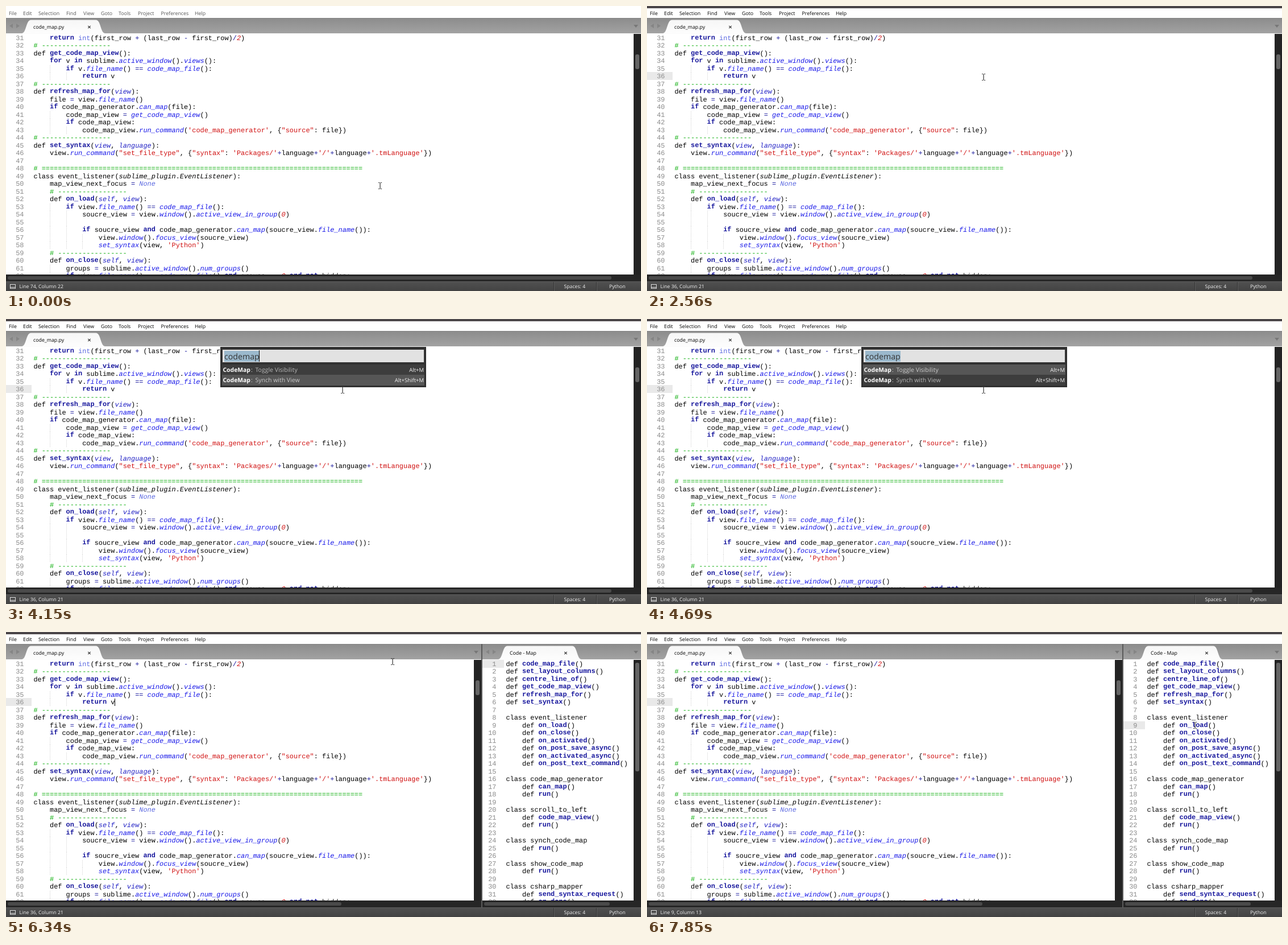
An HTML page with a canvas for the animation above (8000 ms loop, 1117 px wide and 501 px high).

```html
<!DOCTYPE html>
<html lang="en">
<head>
<meta charset="utf-8">
<title>Code map</title>
<style>
html, body { margin: 0; width: 100%; height: 100%; overflow: hidden; background: #fff; }
canvas { display: block; }
</style>
</head>
<body>
<canvas id="stage" width="1117" height="501"></canvas>
<script>
const ctx = document.getElementById('stage').getContext('2d', { alpha: false });
ctx.textRendering = 'geometricPrecision';

const LOOP = 8000, W = 1117, H = 501;
const BAR_END = 48, TOP = 49, BOTTOM = 472, PITCH = 13.5, CHAR = 7.15;
const MONO = '11.917px "Liberation Mono", monospace';
const UI = '"Open Sans", "Noto Sans", sans-serif';
const NAVY = '#16169c', BLUE = '#1818e8', RED = '#d01010', GREEN = '#00aa00';

const rule = '# ' + '-'.repeat(17);
const CODE = `    return int(first_row + (last_row - first_row)/2)
${rule}
def get_code_map_view():
    for v in sublime.active_window().views():
        if v.file_name() == code_map_file():
            return v
${rule}
def refresh_map_for(view):
    file = view.file_name()
    if code_map_generator.can_map(file):
        code_map_view = get_code_map_view()
        if code_map_view:
            code_map_view.run_command('code_map_generator', {"source": file})
${rule}
def set_syntax(view, language):
    view.run_command("set_file_type", {"syntax": 'Packages/'+language+'/'+language+'.tmLanguage'})

# ${'='.repeat(79)}
class event_listener(sublime_plugin.EventListener):
    map_view_next_focus = None
    ${rule}
    def on_load(self, view):
        if view.file_name() == code_map_file():
            soucre_view = view.window().active_view_in_group(0)
            
            if soucre_view and code_map_generator.can_map(soucre_view.file_name()):
                view.window().focus_view(soucre_view)
                set_syntax(view, 'Python')
    ${rule}
    def on_close(self, view):
        groups = sublime.active_window().num_groups()
        if view.file_name() == code_map_file() and groups == 2 and not hidden:`.split('\n');

const MAP = [
  ['', 'code_map_file set_layout_columns centre_line_of get_code_map_view refresh_map_for set_syntax'],
  ['event_listener', 'on_load on_close on_activated on_post_save_async on_activated_async on_post_text_command'],
  ['code_map_generator', 'can_map run'],
  ['scroll_to_left', 'code_map_view run'],
  ['synch_code_map', 'run'],
  ['show_code_map', 'run'],
  ['csharp_mapper', 'send_syntax_request on_done']
].flatMap(([name, defs]) => {
  const list = defs.split(' ').map(d => (name ? '    ' : '') + `def ${d}()`);
  return name ? ['', 'class ' + name, ...list] : list;
});

const MENU = [['File', 5], ['Edit', 30], ['Selection', 57], ['Find', 106], ['View', 136], ['Goto', 167],
  ['Tools', 198], ['Project', 232], ['Preferences', 272.5], ['Help', 332]];

// time, x, y
const MOUSE = [[0, 658, 316], [1430, 703, 295], [1580, 629, 179], [1730, 616, 142], [1880, 592, 124],
  [2030, 592, 125], [6340, 680, 52], [6490, 775, 13], [6610, 885, 27], [6730, 941, 77], [6880, 930, 135],
  [7000, 917, 192], [7150, 955, 183], [7280, 959, 180], [7430, 963, 167], [7580, 964, 166], [7700, 964, 165],
  [7850, 964, 164]];
// time, opacity
const CARET = [[0, 0], [2030, 1], [2560, 0], [5130, 1], [5520, .75], [5660, .35], [5790, 0], [6190, .5], [6340, 1],
  [6490, .75], [6610, .35], [6730, 0], [7150, .35], [7280, 1], [7580, .4], [7700, 0]];
const INPUT_CARET = [[0, 1], [3510, .4], [3630, 0], [4150, 1], [4450, .7], [4570, .35], [4690, 0]];

const at = (track, t) => track.findLast(k => k[0] <= t);

function box(x0, y0, x1, y1, fill) {
  ctx.fillStyle = fill;
  ctx.fillRect(x0, y0, x1 - x0, y1 - y0);
}

function pill(x0, y0, x1, y1, fill) {
  ctx.fillStyle = fill;
  ctx.beginPath();
  ctx.roundRect(x0, y0, x1 - x0, y1 - y0, 3);
  ctx.fill();
}

function poly(points, fill) {
  ctx.fillStyle = fill;
  ctx.beginPath();
  points.forEach(([x, y]) => ctx.lineTo(x, y));
  ctx.closePath();
  ctx.fill();
}

function text(str, x, y, fill, font, align = 'left') {
  ctx.font = font;
  ctx.fillStyle = fill;
  ctx.textAlign = align;
  ctx.fillText(str, x, y);
}

const ui = (str, x, y, fill, size = 8.8, align = 'left', weight = '') =>
  text(str, x, y, fill, `${weight} ${size}px ${UI}`, align);

function shade(y0, y1, a, b) {
  const g = ctx.createLinearGradient(0, y0, 0, y1);
  g.addColorStop(0, a);
  g.addColorStop(1, b);
  return g;
}

const TOKEN = /#.*|'[^']*'|"[^"]*"|\w+|[=+\-\/]+|[^\s\w]/g;

// Splits a line into [column, string, colour, style].
function highlight(line) {
  const out = [];
  let owner = '', prev = '';
  for (const m of line.matchAll(TOKEN)) {
    const s = m[0], call = line[m.index + s.length] === '(';
    let colour = '#000', style = '';
    if (s[0] === '#') colour = GREEN;
    else if (/^['"]/.test(s)) colour = RED;
    else if (s === 'def' || s === 'class') owner = s;
    else if (prev === 'def') [colour, style] = [NAVY, 'bold'];
    else if (prev === 'class') style = '';
    else if (/^(return|for|in|if|and|not)$/.test(s)) [colour, style] = [NAVY, 'bold'];
    else if (s === 'None') [colour, style] = ['#5a68e0', 'italic'];
    else if (s === 'int') colour = '#5a68e0';
    else if (/^\d/.test(s)) [colour, style] = [RED, 'italic'];
    else if (/^\w/.test(s) && owner) [colour, style] = [owner === 'def' ? '#2020c4' : '#000', 'italic'];
    else if (call && /^\w/.test(s)) [colour, style] = [BLUE, 'italic'];
    else if (/^[=+\-\/]/.test(s)) colour = NAVY;
    out.push([m.index, s, colour, style]);
    prev = s;
  }
  return out;
}

const prepare = lines => lines.map(l => ({ indent: l.search(/\S|$/), tokens: highlight(l) }));
const codeLines = prepare(CODE), mapLines = prepare(MAP);

function drawLines(lines, first, x, numberX) {
  lines.forEach(({ indent, tokens }, i) => {
    const y = Math.round(59.5 + i * PITCH);
    text(first + i, numberX, y, '#8a8a8a', MONO, 'right');
    for (let c = 4; c < indent; c += 4) {
      const gx = Math.round(x + c * CHAR);
      for (let d = 0; d < PITCH; d += 2) box(gx, y - 10 + d, gx + 1, y - 9 + d, '#d4d4d4');
    }
    for (const [col, s, colour, style] of tokens)
      text(s, x + col * CHAR, y - (style === 'bold' ? .6 : 0), colour, `${style} ${MONO}`);
  });
}

function drawTab(x, right, title, titleX, closeX) {
  box(x, 21, right, BAR_END, shade(21, BAR_END, '#8c8c8c', '#a2a2a2'));
  box(x, 21, right, 22, '#808080');
  box(x, BAR_END, right, TOP, '#fafafa');
  const a = titleX - 18, b = titleX + 124;
  ctx.beginPath();
  ctx.moveTo(a - 2, BAR_END);
  ctx.bezierCurveTo(a + 6, 47, a + 5, 24.5, a + 14, 24.5);
  ctx.lineTo(b - 14, 24.5);
  ctx.bezierCurveTo(b - 5, 24.5, b - 6, 47, b + 2, BAR_END);
  ctx.fillStyle = shade(24, BAR_END, '#f6f6f6', '#fdfdfd');
  ctx.fill();
  ui(title, titleX, 40, '#000');
  ctx.strokeStyle = '#333';
  ctx.lineWidth = 1.2;
  ctx.beginPath();
  for (const s of [-1, 1]) {
    ctx.moveTo(closeX - 2.2, 37 - 2.2 * s);
    ctx.lineTo(closeX + 2.2, 37 + 2.2 * s);
  }
  ctx.stroke();
  poly([[x + 6, 35], [x + 12, 31], [x + 12, 39]], '#858585');
  poly([[x + 24, 35], [x + 18, 31], [x + 18, 39]], '#858585');
  poly([[right - 13, 33], [right - 5, 33], [right - 9, 38]], '#777');
}

function drawPane(p) {
  const edge = p.right - 13;
  ctx.save();
  ctx.beginPath();
  ctx.rect(p.x, 21, p.right - p.x, 463);
  ctx.clip();
  box(p.x, TOP, edge, BOTTOM, '#fff');
  if (p.active) {
    const y = Math.round(TOP + (p.active - p.first) * PITCH - .5);
    box(p.x, Math.max(TOP, y), p.gutter, y + 14, '#e9e9e9');
  }
  drawLines(p.lines, p.first, p.textX, p.numberX);
  drawTab(p.x, p.right, p.title, p.titleX, p.closeX);
  box(edge, TOP, p.right, BOTTOM, '#232323');
  pill(edge + 3, p.thumb[0], edge + 10, p.thumb[1], '#646464');
  box(p.x, BOTTOM, p.right, 484, '#262626');
  pill(p.x + 3, 475, p.scrollEnd, 481, '#4a4a4a');
  ctx.restore();
}

function drawPalette(t) {
  box(377, TOP, 739, 120, '#303030');
  box(380, 53, 736, 77, '#3c3c3c');
  box(381, 54, 735, 76, '#e2e2e2');
  box(384, 56, 446, 75, '#9bb9cd');
  ui('codemap', 384, 71, '#333', 14.2);
  ctx.globalAlpha = at(INPUT_CARET, t)[1];
  box(445, 55, 446, 75, '#000');
  ctx.globalAlpha = 1;
  const chosen = t < 4310 ? 1 : 0;
  [['Toggle Visibility', 'Alt+M'], ['Synch with View', 'Alt+Shift+M']].forEach(([label, keys], i) => {
    const y = 80 + i * 18, on = i === chosen;
    box(380, y, 736, y + 18 + i, on ? '#565656' : '#3d3d3d');
    ui('CodeMap', 381.5, y + 13, '#fff', 10.4, 'left', 'bold');
    ui(':', 431, y + 13, '#ccc', 10.4);
    ui(label, 438.5, y + 13, on ? '#ccc' : '#b8b8b8', 10.5);
    ui(keys, 735, y + 12.5, '#f4f4f4', 9.5, 'right');
  });
}

function drawStatus(label) {
  box(0, 484, W, H, shade(484, H, '#515151', '#434343'));
  box(0, 484, W, 485, '#5c5c5c');
  ctx.strokeStyle = '#ddd';
  ctx.lineWidth = 1;
  ctx.strokeRect(7.5, 489.5, 9, 7);
  box(8, 494, 16, 495, '#ddd');
  for (const x of [963, 1038]) {
    box(x, 485, x + 1, H, '#353535');
    box(x + 1, 485, x + 2, H, '#5d5d5d');
  }
  ui(label, 23.5, 496, '#f0f0f0', 8.7);
  ui('Spaces: 4', 981.5, 496, '#f0f0f0', 8.7);
  ui('Python', 1061, 496, '#f0f0f0', 8.7);
}

function drawMouse(x, y) {
  if (y < TOP) {
    const shape = [[0, 0], [0, 13], [3, 10.2], [5, 15], [7, 14.2], [5, 9.5], [9, 9.3]].map(([a, b]) => [x + a, y + b]);
    poly(shape, '#fff');
    ctx.strokeStyle = '#000';
    ctx.lineWidth = .9;
    ctx.stroke();
    return;
  }
  box(x - .5, y - 5, x + .7, y + 5, '#333');
  for (const s of [-6, 5]) {
    box(x - 3, y + s, x - .5, y + s + 1, '#444');
    box(x + .7, y + s, x + 3.2, y + s + 1, '#444');
  }
}

function draw(t) {
  const focused = t >= 2030, split = t >= 5130, jumped = t >= 7850;
  box(0, 0, W, 21, '#fff');
  if (focused) box(0, 0, W, 4, '#4b4649');
  MENU.forEach(([s, x]) => ui(s, x, 16, focused ? '#000' : '#555'));

  drawPane({
    x: 0, right: split ? 836 : W, lines: codeLines, first: 31, active: focused && 36, gutter: 45,
    textX: 48.4, numberX: 31.5, title: 'code_map.py', titleX: 48, closeX: 146.5,
    thumb: [85, 111], scrollEnd: split ? 590 : 1065
  });
  if (split) {
    box(836, 21, 838, 484, '#5a5a5a');
    drawPane({
      x: 838, right: W, lines: mapLines, first: 1, active: jumped ? 9 : 1, gutter: 876,
      textX: 879.4, numberX: 862.5, title: 'Code - Map', titleX: 886, closeX: 984.5,
      thumb: [54, 245], scrollEnd: 1062
    });
  }
  ctx.globalAlpha = at(CARET, t)[1];
  box(191, 117, 192, 130, '#000');
  ctx.globalAlpha = 1;

  if (t >= 3080 && !split) drawPalette(t);
  drawStatus(jumped ? 'Line 9, Column 13' : focused ? 'Line 36, Column 21' : 'Line 74, Column 22');
  const [, mx, my] = at(MOUSE, t);
  drawMouse(mx, my);
}

const start = performance.now();
function tick() {
  draw((performance.now() - start) % LOOP);
  requestAnimationFrame(tick);
}
tick();
</script>
</body>
</html>
```
